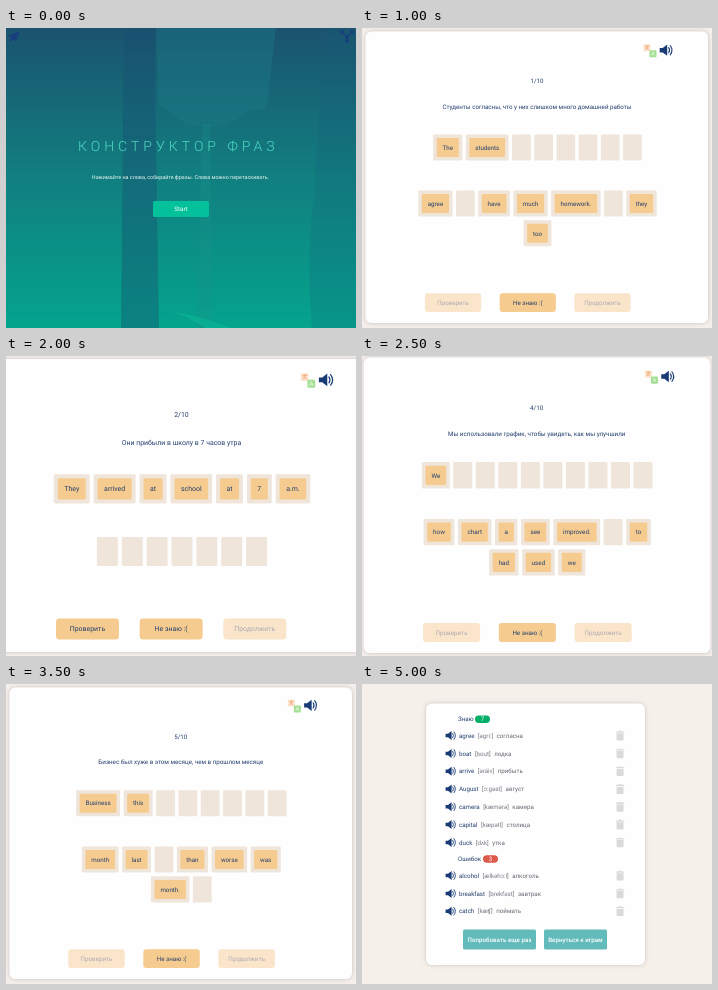
An HTML page for the animation above (5.5 s loop, 350 px wide and 300 px high).

```html
<!DOCTYPE html>
<html lang="ru">
<head>
<meta charset="utf-8">
<title>Phrase builder</title>
<style>
  html, body { margin: 0; width: 100%; height: 100%; overflow: hidden; background: #f5efe9; }
  svg { display: block; width: 350px; height: 300px; }
  text { font: 6.2px Roboto, Arial, sans-serif; fill: #24406f; text-rendering: geometricPrecision; white-space: pre; }
</style>
</head>
<body>
<svg id="stage" viewBox="0 0 350 300">
  <defs>
    <linearGradient id="dusk" x1="0" y1="0" x2="0" y2="1">
      <stop offset="0" stop-color="#1b536f"/>
      <stop offset=".5" stop-color="#117f80"/>
      <stop offset="1" stop-color="#04a48d"/>
    </linearGradient>
    <filter id="shade" x="-10%" y="-10%" width="120%" height="120%">
      <feDropShadow dx="0" dy="0" stdDeviation="2" flood-color="#6f6a70" flood-opacity=".38"/>
    </filter>
  </defs>
</svg>
<script>
const stage = document.getElementById('stage');
const pen = document.createElement('canvas').getContext('2d');
pen.font = '62px Roboto, Arial, sans-serif';

const NAVY = '#24406f', SAND = '#efe5da', AMBER = '#f6cb8f', GREEN = '#03af68';
const STEP = 500, LOOP = 5500;

const rect = (x, y, w, h, fill, r = 0, extra = '') =>
  `<rect x="${x}" y="${y}" width="${w}" height="${h}" rx="${r}" fill="${fill}" ${extra}/>`;
const path = (d, fill, extra = '') => `<path d="${d}" fill="${fill}" ${extra}/>`;
const label = (x, y, str, fill = NAVY, anchor = 'middle', style = '') =>
  `<text x="${x}" y="${y}" text-anchor="${anchor}" style="fill:${fill};${style}">${str}</text>`;
const group = (transform, body) => `<g transform="${transform}">${body}</g>`;

// Loudspeaker about 13 wide, centred on the origin.
const speaker = (x, y, k = 1) => group(`translate(${x} ${y}) scale(${k})`,
  path('M-6.5-2.2h3L1-5.6v11.2L-3.5 2.2h-3z', '#183b75') +
  path('M2.5-2.6q1.8 2.6 0 5.2M4-4.7q3.6 4.7 0 9.4', 'none',
    'stroke="#183b75" stroke-width="1.1" stroke-linecap="round"'));

const translateIcon = (x, y) => group(`translate(${x} ${y})`,
  rect(0, 0, 7, 7, '#fbe3cc', 1) +
  path('M1.5 2h4M3.5 1v1M2 5.5L5 2M2.2 3l3 2.5', 'none', 'stroke="#ef9d6c" stroke-width=".7"') +
  rect(6, 6, 7, 7, '#a4df94', 1) +
  path('M8 11.3l1.5-3.8 1.5 3.8M8.6 10h1.8', 'none', 'stroke="#e6f7e0" stroke-width=".7"'));

function introScene() {
  const tint = 'opacity=".38"';
  return rect(0, 0, 350, 300, 'url(#dusk)') +
    path('M150 0H270L261 78Q255 84 246 81L222 96Q200 101 181 97L152 76z', '#1c7d87', 'opacity=".38"') +
    path('M196 97h8l3 203h-16z', '#1b9188', 'opacity=".28"') +
    path('M118 0h30l5 300h-38z', '#154d70', tint) +
    path('M318 0h32v300H306q-6-70 2-130z', '#17597a', 'opacity=".2"') +
    path('M168 284q30 5 57 16h-26q-14-10-31-16z', '#0cb898', 'opacity=".6"') +
    path('M14 3L2 8l3 1.5-1 4 4-2 2 2z', '#183f7b') +
    path('M336 4l5 5 5-5M341 9v4', 'none', 'stroke="#183f7b" stroke-width="1.2"') +
    [[336, 4], [346, 4], [341, 9], [341, 13]].map(([x, y]) =>
      `<circle cx="${x}" cy="${y}" r="1.9" fill="#183f7b"/>`).join('') +
    label(72, 122.8, 'КОНСТРУКТОР ФРАЗ', '#4ed8c2', 'start',
      'font-size:14px;font-weight:300;letter-spacing:4px') +
    label(174.5, 151, 'Нажимайте на слова, собирайте фразы. Слова можно перетаскивать.',
      '#e8f6f3', 'middle', 'font-size:5.4px') +
    rect(147, 173, 56, 16, '#03c29b', 1.5) +
    label(175, 183.2, 'Start', '#fff');
}

const textWidth = str => str === '_' ? 0 : pen.measureText(str).width / 10;

// Centred rows of word chips; "_" is a vacant slot and "/" starts a new row.
function chips(words, top, fill, ink) {
  return words.split(' / ').map((line, row) => {
    const items = line.split(' ');
    const widths = items.map(w => textWidth(w) + 18.7);
    let x = -(widths.reduce((a, b) => a + b, 0) + 3.5 * (items.length - 1)) / 2;
    const y = top + row * 29.8;
    return items.map((word, i) => {
      const w = widths[i], left = x;
      x += w + 3.5;
      const slot = rect(left, y, w, 26, SAND, 1.2);
      return word === '_' ? slot : slot +
        rect(left + 3.5, y + 3.5, w - 7, 19, fill, 1.2) +
        label(left + w / 2, y + 15.2, word, ink);
    }).join('');
  }).join('');
}

function quizScene({ n, text, answer, bank, on, scale, cx, dy, btnY, card, done }) {
  const [cardX, cardY, cardW, cardH] = card;
  const bankTop = 162.5 + (answer.split(' / ').length - 1) * 29.8;
  const buttons = ['Проверить', 'Не знаю :(', 'Продолжить'].map((name, i) => {
    const live = on[i] === '1', x = -112.5 + i * 74.7;
    return rect(x, 0, 56.2, 18.8, live ? AMBER : '#fae5ca', 3) +
      label(x + 28.1, 11.6, name, live ? NAVY : '#aeaab2');
  }).join('');
  return rect(0, 0, 350, 300, '#f5efeb') +
    rect(cardX, cardY, cardW, cardH, '#fefefe', 6, 'filter="url(#shade)"') +
    group(`translate(${cx} ${dy}) scale(${scale})`,
      translateIcon(106, 16.2) + speaker(128.7, 22.2) +
      label(-.5, 55.3, n + '/10') + label(-.5, 80.6, text) +
      chips(answer, 106.5, done ? GREEN : AMBER, done ? '#174f6a' : NAVY) +
      chips(bank, bankTop, AMBER, NAVY)) +
    group(`translate(${cx} ${btnY}) scale(${scale})`, buttons);
}

function wordRow([word, sound, meaning], y) {
  return speaker(88.8, y, .8) +
    `<text x="97" y="${y + 2.2}">${word}<tspan dx="3.5" fill="#777b84">[${sound}]</tspan>` +
    `<tspan dx="3.5" fill="#666a73">${meaning}</tspan></text>` +
    path(`M254 ${y - 4.2}h2.5l.8-.8h1.6l.8.8h2.5v1.3h-8.2zM254.6 ${y - 2.3}h7v6q0 1.2-1.2 1.2h-4.6q-1.2 0-1.2-1.2z`, '#dadada');
}

function resultScene() {
  const known = [['agree', 'əgri:', 'согласна'], ['boat', 'bout', 'лодка'], ['arrive', 'əráiv', 'прибыть'],
    ['August', 'ɔ:gəst', 'август'], ['camera', 'kæmərə', 'камера'], ['capital', 'kæpətl', 'столица'], ['duck', 'dʌk', 'утка']];
  const missed = [['alcohol', 'ælkəhɔ:l', 'алкоголь'], ['breakfast', 'brekfəst', 'завтрак'], ['catch', 'kæʧ', 'поймать']];
  const heading = (name, y, x, count, fill) => label(96, y + 2.2, name, NAVY, 'start') +
    rect(x, y - 3.7, 15, 7.4, fill, 3.7) + label(x + 7.5, y + 2.2, count, '#fff');
  const button = (x, w, name) => rect(x, 245.5, w, 20, '#62babb', 1.5) +
    label(x + w / 2, 257.8, name, '#fff', 'middle', 'font-weight:500');
  return rect(0, 0, 350, 300, '#f6f0ea') +
    rect(64, 19.5, 219, 261.5, '#fefefe', 6, 'filter="url(#shade)"') +
    heading('Знаю', 35.2, 113, 7, GREEN) +
    known.map((w, i) => wordRow(w, 51.6 + i * 17.8)).join('') +
    heading('Ошибок', 175, 121, 3, '#dc5a4b') +
    missed.map((w, i) => wordRow(w, 191.6 + i * 17.8)).join('') +
    button(101, 73, 'Попробовать еще раз') + button(182, 63, 'Вернуться к играм');
}

const slots = n => Array(n).fill('_').join(' ');
const near = { scale: 1, cx: 175.5, dy: 0, btnY: 265.2, card: [3.5, 3.5, 342.5, 291.5] };
const wide = { scale: 1.015, cx: 175.2, dy: -2, btnY: 267, card: [1.8, 1.5, 346.4, 295.5] };
const close = { scale: 1.12, cx: 176, dy: -1, btnY: 262.4, card: [-8, 3, 366, 293] };
const last = { ...wide, scale: 1.013, cx: 174.6, dy: -2.8, btnY: 266 };

const students = { n: 1, text: 'Студенты согласны, что у них слишком много домашней работы' };
const school = { n: 2, text: 'Они прибыли в школу в 7 часов утра' };
const chart = { n: 4, text: 'Мы использовали график, чтобы увидеть, как мы улучшили' };
const business = { n: 5, text: 'Бизнес был хуже в этом месяце, чем в прошлом месяце' };
const classmate = { n: 10, text: 'То, как он относился к своему однокласснику, было ужасно' };

const scenes = [
  introScene(),
  quizScene({ ...students, ...wide, on: '010', answer: slots(8),
    bank: 'agree students have much homework. / The they too' }),
  quizScene({ ...students, ...near, on: '010', answer: 'The students ' + slots(6),
    bank: 'agree _ have much homework. _ they / too' }),
  quizScene({ ...students, ...wide, on: '101', done: true,
    answer: 'The students agree they have too / much homework.', bank: slots(8) }),
  quizScene({ ...school, ...close, on: '110', answer: 'They arrived at school at 7 a.m.', bank: slots(7) }),
  quizScene({ ...chart, ...wide, on: '010', answer: 'We ' + slots(9),
    bank: 'how chart a see improved. _ to / had used we' }),
  quizScene({ ...chart, ...wide, on: '101', done: true,
    answer: 'We used a chart to see how / we had improved.', bank: slots(10) }),
  quizScene({ ...business, ...near, scale: 1.005, cx: 175.3, dy: -.9, on: '010',
    answer: 'Business this ' + slots(6), bank: 'month last _ than worse was / month. _' }),
  quizScene({ ...classmate, ...last, scale: 1.005, on: '010', answer: 'The way ' + slots(6),
    bank: 'terrible. he _ treated was classmate _ / his' }),
  quizScene({ ...classmate, ...last, on: '101', done: true,
    answer: 'The way he treated his classmate / was terrible.', bank: slots(8) }),
  resultScene()
];

stage.insertAdjacentHTML('beforeend', scenes.map(s => `<g class="scene" display="none">${s}</g>`).join(''));
const layers = [...stage.querySelectorAll('.scene')];

function show(time) {
  const current = Math.floor((time % LOOP) / STEP);
  layers.forEach((layer, i) => layer.setAttribute('display', i === current ? 'inline' : 'none'));
}

const start = performance.now();
function tick() {
  show(performance.now() - start);
  requestAnimationFrame(tick);
}
tick();
</script>
</body>
</html>
```
